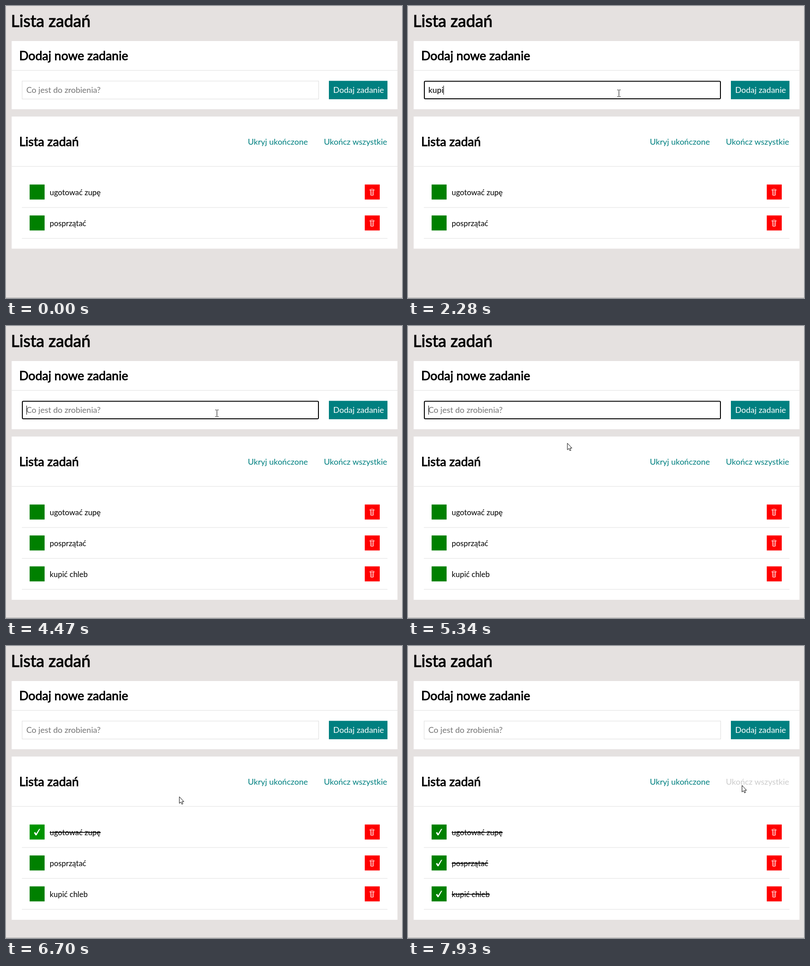
These frames come from a looping animation (872 px wide and 642 px high, 8 s). An HTML page:

```html
<!DOCTYPE html>
<html lang="pl">
<head>
<meta charset="utf-8">
<title>Lista zadań</title>
<style>
html, body { margin: 0; width: 100%; height: 100%; overflow: hidden; background: #e5e1e0; }
svg { display: block; }
text { font: 18px Lato, sans-serif; white-space: pre; }
.h1, .h2 { stroke: #000; paint-order: stroke; }
.h1 { font-size: 36px; stroke-width: 1.1px; }
.h2 { font-size: 27px; stroke-width: .94px; }
.item { font-size: 16.875px; }
.link { fill: teal; }
.line { fill: #e0e0e0; }
</style>
</head>
<body>
<svg id="stage" width="872" height="642" viewBox="0 0 872 642">
  <rect y="641" width="872" height="1" fill="#b4b2b1"/>
  <text class="h1" x="11" y="46">Lista zadań</text>

  <rect x="12.5" y="77" width="849.5" height="150" fill="#fff"/>
  <text class="h2" x="29" y="118.5">Dodaj nowe zadanie</text>
  <rect class="line" x="12.5" y="141" width="849.5" height="1"/>
  <rect id="field" fill="#fff"/>
  <text id="entry" x="44.7" y="191"></text>
  <rect id="caret" y="175" width="1" height="20"/>
  <rect x="711" y="164.5" width="129" height="40.5" fill="teal"/>
  <text x="720.5" y="191" fill="#fff">Dodaj zadanie</text>

  <rect id="panel" x="12.5" y="243" width="849.5" fill="#fff"/>
  <text class="h2" x="29" y="308">Lista zadań</text>
  <text class="link" x="532.5" y="304.5">Ukryj ukończone</text>
  <text class="link" id="all" x="700" y="304.5">Ukończ wszystkie</text>
  <rect class="line" x="12.5" y="352" width="849.5" height="1"/>
  <g id="rows"></g>

  <g id="beam" fill="none" stroke="#000">
    <path d="M-3.5-7.5H-1L0-6.5 1-7.5H3.5M0-6.5V6.5M-3.5 7.5H-1L0 6.5 1 7.5H3.5"/>
  </g>
  <path id="arrow" d="M.5.5V15L3.8 12 6 17 8.3 16 6.2 11.2H10.5Z" fill="#fff" stroke="#000"/>
</svg>
<script>
const $ = id => document.getElementById(id);
const set = (el, attrs) => { for (const k in attrs) el.setAttribute(k, attrs[k]); };
const show = (el, on) => el.style.display = on ? '' : 'none';

const LOOP = 8000, FOCUS = 950, SUBMIT = 4470, BLUR = 6220, DONE = 6300, ALL = 7930;
const phrase = 'kupić chleb';
const keyTimes = [1610, 1810, 2080, 2280, 2610, 2810, 3160, 3480, 3560, 3760, 4140];

// pointer hot spot: time, x, y
const path = [
  [260, 684, 471], [400, 612, 360], [540, 522, 240], [660, 472, 174], [730, 464.5, 192],
  [5080, 464.5, 192], [5300, 380, 240], [5550, 200, 345], [5820, 82, 410], [6020, 77, 415],
  [6360, 77, 415], [6500, 190, 385], [6700, 381, 331], [7050, 470, 325],
  [7400, 620, 312], [7800, 735, 306], [8000, 735, 306]
];

$('rows').innerHTML = ['ugotować zupę', 'posprzątać', phrase].map((label, i) => `
  <g transform="translate(0 ${i * 68})">
    <rect class="box" x="52" y="392.5" width="33" height="33" fill="green"/>
    <path class="check" d="M61.5 410.5 64.3 409 66.4 412.6 72.8 402.4 75.5 401.8 67.2 416.3H65Z" fill="#fff"/>
    <text class="item" x="96.3" y="415.5">${label}</text>
    <rect x="790" y="392.5" width="33" height="33" fill="red"/>
    <g fill="none" stroke="#fff">
      <path d="M801.5 405.5V403.5Q806 401.5 810.5 403.5V405.5Z"/>
      <path d="M802.5 405.5 803 416Q806 417 809 416L809.5 405.5"/>
      <path d="M804.6 407V415.5M807.4 407V415.5" stroke-width=".8"/>
    </g>
    <rect class="line" x="35" y="442.5" width="805" height="1"/>
  </g>`).join('');
const rows = [...$('rows').children];

function pointerAt(t) {
  const i = path.findIndex(p => p[0] > t);
  if (i < 1) return null;
  const [t0, x0, y0] = path[i - 1], [t1, x1, y1] = path[i];
  const k = (t - t0) / (t1 - t0);
  return [x0 + (x1 - x0) * k, y0 + (y1 - y0) * k];
}

function drawForm(t) {
  const focus = t >= FOCUS && t < BLUR;
  set($('field'), focus
    ? { x: 36, y: 165.5, width: 652, height: 38.5, rx: 2, stroke: '#000', 'stroke-width': 2 }
    : { x: 35.5, y: 165, width: 653, height: 39.5, rx: 0, stroke: '#ddd', 'stroke-width': 1 });
  const typed = t < SUBMIT ? phrase.slice(0, keyTimes.filter(k => k <= t).length) : '';
  const entry = $('entry');
  entry.textContent = typed || 'Co jest do zrobienia?';
  set(entry, { fill: typed ? '#000' : '#757575' });
  const blinkOn = t < 4750 || (t >= 5280 && t < 5810);
  show($('caret'), focus && blinkOn);
  set($('caret'), { x: Math.floor(45 + (typed ? entry.getComputedTextLength() : 0)) });
}

function drawList(t) {
  const added = t >= SUBMIT;
  set($('panel'), { height: added ? 359 : 290.5 });
  show(rows[2], added);
  rows.forEach((row, i) => {
    const done = t >= (i ? ALL : DONE);
    show(row.querySelector('.check'), done);
    row.querySelector('.item').style.textDecoration = done ? 'line-through' : 'none';
  });
  const rise = Math.min(1, Math.max(0, (t - 5820) / 500));
  const fall = Math.min(1, Math.max(0, (6980 - t) / 280));
  set(rows[0].querySelector('.box'), { fill: `rgb(0 ${128 + 20 * Math.min(rise, fall)} 0)` });
  $('all').style.fill = t >= ALL ? '#ccc' : t >= 7650 ? '#009090' : 'teal';
}

function drawPointer(t) {
  const at = pointerAt(t);
  const inField = at && at[0] > 35 && at[0] < 689 && at[1] > 164 && at[1] < 205;
  show($('beam'), inField);
  show($('arrow'), at && !inField);
  if (at) set($(inField ? 'beam' : 'arrow'), { transform: `translate(${at})` });
}

function frame(now) {
  const t = now % LOOP;
  drawForm(t);
  drawList(t);
  drawPointer(t);
  requestAnimationFrame(frame);
}
frame(0);
requestAnimationFrame(frame);
</script>
</body>
</html>
```
